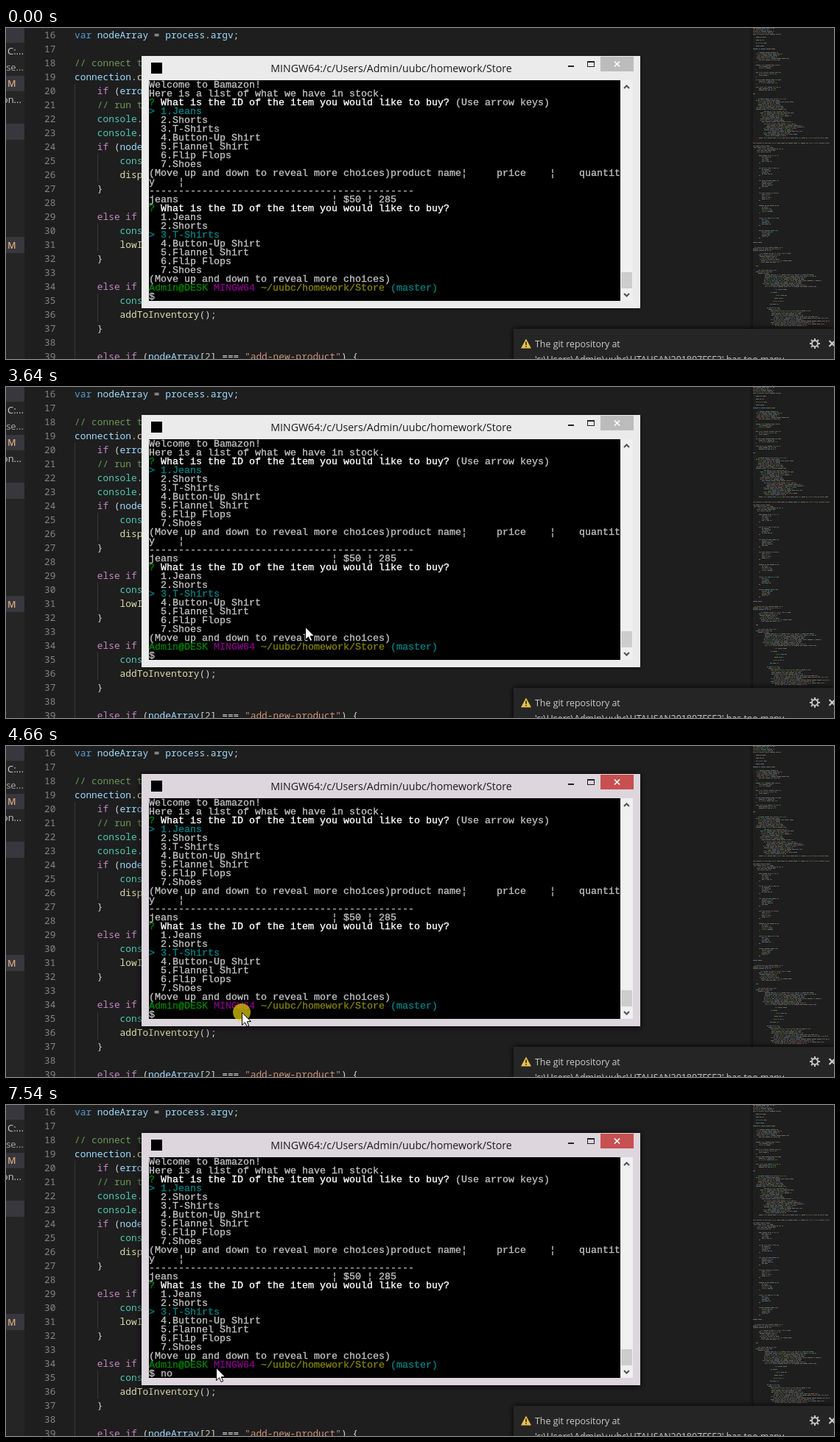
Animation of 1124x450 px, one loop 8 s. Source, as an HTML page with a canvas:

```html
<!DOCTYPE html>
<html lang="en">
<head>
<meta charset="utf-8">
<title>Store prompt</title>
<style>
html, body { margin: 0; width: 100%; height: 100%; overflow: hidden; background: #1e1e1e; }
canvas { display: block; }
</style>
</head>
<body>
<canvas id="stage" width="1124" height="450"></canvas>
<script>
const W = 1124, H = 450, LOOP = 8000;
const UI = '"Open Sans", "Noto Sans", sans-serif';
const CODE_FONT = '12.83px "Noto Sans Mono", "DejaVu Sans Mono", monospace';
const TERM_FONT = '13.333px "Liberation Mono", "DejaVu Sans Mono", monospace';
const USER = 'Admin', HOST = 'DESK';

function rect(g, color, x, y, w, h) {
  g.fillStyle = color;
  g.fillRect(x, y, w, h);
}

function label(g, text, x, y, color, font, align = 'left') {
  g.font = font;
  g.textAlign = align;
  g.fillStyle = color;
  g.fillText(text, x, y);
}

function path(g, points) {
  g.beginPath();
  points.forEach(([x, y]) => g.lineTo(x, y));
}

function stroke(g, color, width, points) {
  path(g, points);
  g.strokeStyle = color;
  g.lineWidth = width;
  g.stroke();
}

function cross(g, color, x, y, r, width) {
  stroke(g, color, width, [[x - r, y - r], [x + r, y + r]]);
  stroke(g, color, width, [[x - r, y + r], [x + r, y - r]]);
}

// --- Editor ---------------------------------------------------------------
const INK = { k: '#569cd6', v: '#9cdcfe', p: '#d4d4d4', c: '#6a9955', f: '#dcdcaa',
              i: '#c586c0', o: '#4ec9b0', s: '#ce9178', n: '#b5cea8' };
const FIRST_LINE = 16, PITCH = 19, CODE_X = 93, CODE_CH = 7.7;

// Each line: indent level, then pairs of ink and text.
const CODE = [
  [0, 'k', 'var ', 'v', 'nodeArray', 'p', ' = ', 'v', 'process', 'p', '.', 'v', 'argv', 'p', ';'],
  [0],
  [0, 'c', '// connect to'],
  [0, 'v', 'connection', 'p', '.', 'f', 'connect'],
  [1, 'i', 'if', 'p', ' (', 'v', 'error'],
  [1, 'c', '// run the'],
  [1, 'o', 'console', 'p', '.'],
  [1, 'o', 'console', 'p', '.'],
  [1, 'i', 'if', 'p', ' (', 'v', 'nodeArray'],
  [2, 'o', 'console'],
  [2, 'f', 'display'],
  [1, 'p', '}'],
  [1],
  [1, 'i', 'else if'],
  [2, 'o', 'console'],
  [2, 'f', 'lowInv'],
  [1, 'p', '}'],
  [1],
  [1, 'i', 'else if'],
  [2, 'o', 'console'],
  [2, 'f', 'addToInventory', 'p', '();'],
  [1, 'p', '}'],
  [1],
  [1, 'i', 'else if', 'p', ' (', 'v', 'nodeArray', 'p', '[', 'n', '2', 'p', '] === ',
   's', '"add-new-product"', 'p', ') {']
];

function drawCode(g) {
  CODE.forEach(([indent, ...parts], row) => {
    const base = 14 + row * PITCH;
    label(g, String(FIRST_LINE + row), 67.5, base, '#858585', CODE_FONT, 'right');
    for (let level = 0; level < indent; level++) {
      rect(g, '#393939', Math.round(CODE_X + level * 4 * CODE_CH), base - 14, 1, PITCH);
    }
    let col = indent * 4;
    for (let i = 0; i < parts.length; i += 2) {
      for (const ch of parts[i + 1]) {
        label(g, ch, CODE_X + col++ * CODE_CH, base, INK[parts[i]], CODE_FONT);
      }
    }
  });
}

function drawSidebar(g) {
  rect(g, '#252526', 0, 0, 25, H);
  [[0, 20], [65, 21], [130, 22], [284, 22]].forEach(([y, h]) => rect(g, '#37373d', 0, y, 25, h));
  const font = '13px ' + UI;
  label(g, 'C:...', 24, 36, '#cccccc', font, 'right');
  label(g, 'Use...', 24, 58, '#a8a8a8', font, 'right');
  label(g, 'on...', 21, 102, '#cccccc', font, 'right');
  [80, 300].forEach(y => label(g, 'M', 2, y, '#d8a57c', '600 12.5px ' + UI));
}

function drawMinimap(g) {
  let seed = 11;
  const rnd = () => (seed = seed * 16807 % 2147483647) / 2147483647;
  const inks = ['#d4d4d4', '#9cdcfe', '#dcdcaa', '#ce9178', '#6a9955', '#b0b0b0'];

  function line(y, indent, length) {
    let x = 1014 + indent;
    const end = Math.min(x + length, 1122);
    while (x < end) {
      const w = Math.min(2 + Math.floor(rnd() * 6), end - x);
      rect(g, inks[Math.floor(rnd() * inks.length)], x, y, w, 1);
      x += w + 1;
    }
  }
  function block(y, rows, indent, depth, length, pitch = 2) {
    for (let i = 0; i < rows; i++) {
      line(y + i * pitch, indent + Math.floor(rnd() * depth), length * (0.5 + rnd() * 0.5));
    }
  }

  const shade = g.createLinearGradient(1009, 0, 1014, 0);
  shade.addColorStop(0, 'rgba(0,0,0,0)');
  shade.addColorStop(1, 'rgba(0,0,0,.35)');
  rect(g, shade, 1009, 0, 5, H);

  g.globalAlpha = 0.42;
  block(0, 5, 0, 1, 42);
  block(12, 4, 4, 1, 15, 4);
  line(28, 0, 30);
  block(33, 6, 4, 5, 46);
  for (let i = 0; i < 4; i++) {
    const y = 46 + i * 10;
    line(y, 4, 1);
    line(y + 4, 4, 34);
    block(y + 6, 2, 8, 1, 26);
  }
  line(89, 0, 3);
  block(96, 8, 4, 4, 55);
  block(113, 8, 8, 8, 48);
  block(130, 9, 14, 8, 54);
  line(149, 8, 94);
  line(156, 0, 105);
  block(160, 5, 0, 8, 34);
  for (let i = 0; i < 7; i++) {
    const y = 173 + Math.round(i * 17);
    line(y, 8, 27);
    block(y + 2, 4, 12, 1, 16);
    line(y + 10, 8, 2);
  }
  line(291, 0, 12);
  block(298, 3, 0, 4, 46);
  block(306, 7, 8, 5, 42);
  line(323, 4, 3);
  block(329, 3, 4, 4, 28);
  block(335, 9, 12, 5, 92);
  block(355, 6, 22, 10, 20, 4);
  block(380, 2, 18, 4, 30);
  block(384, 11, 24, 8, 76);
  g.globalAlpha = 1;
}

function drawNotice(g) {
  g.save();
  g.shadowColor = '#000';
  g.shadowBlur = 8;
  rect(g, '#252526', 689, 409, W - 689, 60);
  g.restore();

  path(g, [[706, 422.5], [713, 435.5], [699, 435.5]]);
  g.closePath();
  g.fillStyle = '#e9c04a';
  g.fill();
  rect(g, '#252526', 705.2, 426.5, 1.6, 4.5);
  rect(g, '#252526', 705.2, 432.2, 1.6, 1.6);

  const font = '12.4px ' + UI;
  label(g, 'The git repository at', 718, 434, '#cccccc', font);
  label(g, `'c:\\Users\\${USER}\\uubc\\UTAHSAN201807FSF3' has too many`, 718, 454.5, '#cccccc', font);

  g.strokeStyle = '#c5c5c5';
  g.lineWidth = 2;
  g.beginPath();
  g.arc(1098, 429, 4, 0, 7);
  g.stroke();
  for (let i = 0; i < 8; i++) {
    const a = i * Math.PI / 4, c = Math.cos(a), s = Math.sin(a);
    stroke(g, '#c5c5c5', 2, [[1098 + c * 4.5, 429 + s * 4.5], [1098 + c * 7, 429 + s * 7]]);
  }
  cross(g, '#d0d0d0', 1121.5, 429, 4, 2);
}

// --- Terminal window --------------------------------------------------------
const TERM = { x: 194, y: 71, cw: 8, ch: 12 };
const GRAY = '#c0c0c0', WHITE = '#ffffff', GREEN = '#008000', TEAL = '#008080';
const ITEMS = ['Jeans', 'Shorts', 'T-Shirts', 'Button-Up Shirt', 'Flannel Shirt', 'Flip Flops', 'Shoes'];
const MORE = '(Move up and down to reveal more choices)';
const ASK = 'What is the ID of the item you would like to buy?';

function put(g, row, col, text, color = GRAY) {
  g.font = TERM_FONT;
  g.textAlign = 'left';
  g.fillStyle = g.strokeStyle = color;
  g.lineWidth = 0.35;
  [...text].forEach((ch, i) => {
    if (ch === ' ') return;
    const x = TERM.x + (col + i) * TERM.cw, y = TERM.y + row * TERM.ch + 10;
    g.fillText(ch, x, y);
    g.strokeText(ch, x, y);
  });
}

function putQuestion(g, row, chosen) {
  put(g, row, 0, '?', GREEN);
  put(g, row, 2, ASK, WHITE);
  ITEMS.forEach((item, i) => {
    const on = i === chosen;
    if (on) put(g, row + 1 + i, 0, '>', TEAL);
    put(g, row + 1 + i, 2, `${i + 1}.${item}`, on ? TEAL : GRAY);
  });
  put(g, row + 8, 0, MORE);
}

function drawTerminal(g) {
  rect(g, '#000', 194, 71, 640, 300);
  put(g, 0, 0, 'Welcome to Bamazon!');
  put(g, 1, 0, 'Here is a list of what we have in stock.');
  putQuestion(g, 2, 0);
  put(g, 2, 52, '(Use arrow keys)');
  put(g, 10, 41, 'product name¦');
  put(g, 10, 59, 'price');
  put(g, 10, 68, '¦');
  put(g, 10, 73, 'quantit');
  put(g, 11, 0, 'y    ¦');
  put(g, 12, 0, '-'.repeat(45));
  put(g, 13, 0, 'jeans');
  put(g, 13, 31, '¦ $50 ¦ 285');
  putQuestion(g, 14, 2);
  put(g, 23, 0, `${USER}@${HOST}`, GREEN);
  put(g, 23, 11, 'MINGW64', '#800080');
  put(g, 23, 19, '~/uubc/homework/Store', '#808000');
  put(g, 23, 41, '(master)', TEAL);
  put(g, 24, 0, '$');
}

function drawWindow(g, active) {
  const frame = active ? '#ddd6dd' : '#ebebeb';
  g.save();
  g.shadowColor = active ? 'rgba(0,0,0,.9)' : 'rgba(0,0,0,.5)';
  g.shadowBlur = active ? 9 : 4;
  g.shadowOffsetY = 1;
  rect(g, frame, 184, 38, 677, 343);
  g.restore();

  rect(g, '#000', 197, 47, 15, 15);
  label(g, `MINGW64:/c/Users/${USER}/uubc/homework/Store`, 523, 60, '#1c1c1c', '14.15px ' + UI, 'center');

  rect(g, '#222', 763, 51, 8, 2);
  g.strokeStyle = '#222';
  g.lineWidth = 1;
  g.strokeRect(789.5, 45.5, 9, 7);
  rect(g, '#222', 789, 45, 10, 2);
  rect(g, active ? '#c75050' : '#bcbcbc', 807, 39, 45, 20);
  cross(g, '#fff', 829.5, 49, 3.5, 1.7);

  drawTerminal(g);
  rect(g, '#f0f0f0', 834, 71, 17, 300);
  rect(g, '#cdcdcd', 835, 332, 15, 22);
  stroke(g, '#505050', 2, [[839, 82], [842.5, 78.5], [846, 82]]);
  stroke(g, '#505050', 2, [[839, 361], [842.5, 364.5], [846, 361]]);
}

function makeScene(active) {
  const canvas = document.createElement('canvas');
  canvas.width = W;
  canvas.height = H;
  const g = canvas.getContext('2d');
  rect(g, '#1e1e1e', 0, 0, W, H);
  drawSidebar(g);
  drawCode(g);
  drawMinimap(g);
  drawNotice(g);
  drawWindow(g, active);
  return canvas;
}

// --- Motion -----------------------------------------------------------------
// Pointer moves: start, end, steps, then a curve through from, control and to.
const MOVES = [
  [390, 990, 9, [797, 425], [400, 227], [379, 337]],
  [3640, 3950, 5, [406, 326], [350, 340], [320, 354]],
  [4420, 4660, 4, [320, 356], [320, 359], [320, 362]],
  [5280, 5430, 3, [312, 363], [296, 367], [282, 367]],
  [5730, 5900, 3, [283, 364], [285, 361], [285, 357]]
];
const CLICKS = [[4100, 4270], [4660, 4810], [5900, 6070]];
const KEYS = [[7140, 'n'], [7540, 'o']];
const FOCUS = 4100;

function pointerAt(t) {
  const move = MOVES.filter(m => t >= m[0]).pop();
  if (!move) return null;
  const [start, end, steps, a, b, c] = move;
  const last = steps - 1;
  const step = t >= end ? last : Math.floor((t - start) / (end - start) * last);
  const u = 1 - Math.pow(1 - step / last, 1.3), v = 1 - u;
  return [0, 1].map(i => Math.round(v * v * a[i] + 2 * u * v * b[i] + u * u * c[i]));
}

function drawPointer(g, x, y) {
  g.save();
  g.translate(x + 0.5, y + 0.5);
  path(g, [[0, 0], [0, 17], [4, 13.3], [6.6, 19], [9.2, 17.9], [6.8, 12.3], [12, 12]]);
  g.closePath();
  g.fillStyle = '#fff';
  g.fill();
  g.strokeStyle = '#000';
  g.lineWidth = 1;
  g.stroke();
  g.restore();
}

const ctx = document.getElementById('stage').getContext('2d');
const idle = makeScene(false), focused = makeScene(true);

function draw(t) {
  ctx.drawImage(t < FOCUS ? idle : focused, 0, 0);
  const typed = KEYS.filter(k => t >= k[0]).map(k => k[1]).join('');
  put(ctx, 24, 2, typed);
  const pos = pointerAt(t);
  if (!pos) return;
  if (CLICKS.some(([on, off]) => t >= on && t < off)) {
    ctx.fillStyle = 'rgba(232,210,0,.7)';
    ctx.beginPath();
    ctx.arc(pos[0], pos[1], 12, 0, 7);
    ctx.fill();
  }
  drawPointer(ctx, pos[0], pos[1]);
}

const began = performance.now();
function tick() {
  draw((performance.now() - began) % LOOP);
  requestAnimationFrame(tick);
}
tick();
</script>
</body>
</html>
```
